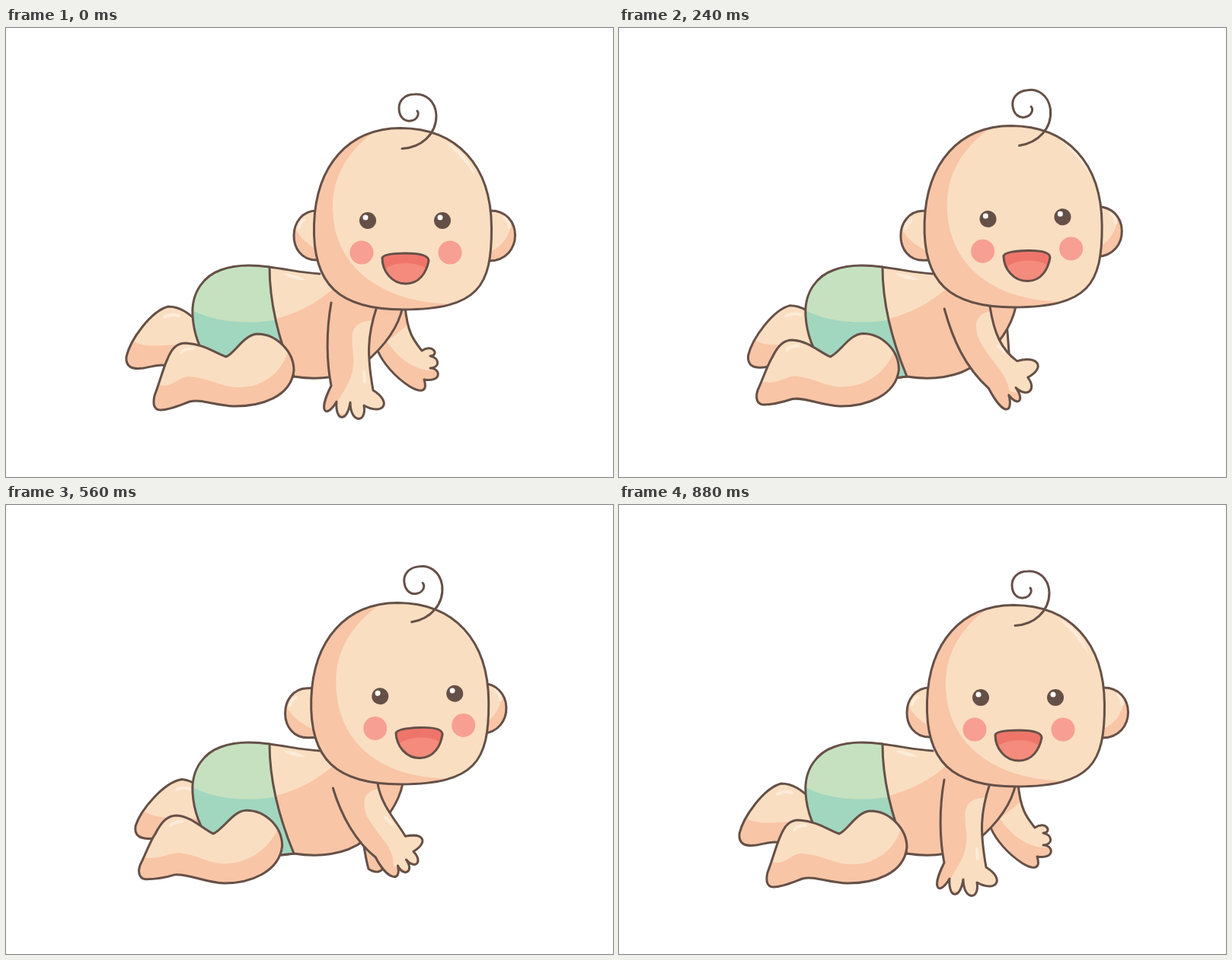
An HTML page with a canvas that plays this animation: 797x590 px, repeating every 0.92 s.

```html
<!DOCTYPE html>
<html lang="en">
<head>
<meta charset="utf-8">
<title>Crawling baby</title>
<style>
html, body { margin: 0; width: 100%; height: 100%; overflow: hidden; background: #fff; }
canvas { display: block; }
</style>
</head>
<body>
<canvas id="stage" width="797" height="590"></canvas>
<script>
const ctx = document.getElementById('stage').getContext('2d');
const LINE = '#655047', SKIN = '#fadec1', SHADE = '#f8c5a6', SHINE = '#fdebd9';
const LOOP = 920, STEP = 40;

// Moves are "x y degrees"; leg is a blend factor, glow shifts the light on the head.
const plant = {
  near: 'M427 361C420 400 421 440 427 470C408 508 422 512 434 491C432 517 448 519 452 492C452 520 474 520 470 496C495 510 508 492 482 476C474 430 474 405 487 366',
  nearLight: 'M490 384C450 384 453 400 456 430C459 465 440 475 430 505L510 520L500 430',
  glint: 'M470 452L471 465',
  far: 'M524 366C527 400 535 410 546 424C560 414 570 430 557 431C570 434 570 446 557 447C570 446 574 466 549 462C554 478 545 480 530 471C510 458 495 440 488 424',
  farLight: 'M500 412C520 440 540 450 560 450L600 430L540 380',
  head: '0 0 0', ears: '0 0 0', hair: '0 0 0', face: '0 0 0', farLeg: '0 0 0', leg: '0', glow: '0'
};
const push = {
  near: 'M426 364C429 410 440 450 458 480C460 526 471 520 477 494C482 518 496 514 491 488C498 510 520 508 513 485C540 484 540 464 508 460C486 425 482 405 487 366',
  nearLight: 'M490 378C455 378 460 400 468 420C488 455 483 470 477 497L500 530L560 460',
  glint: 'M487 417L492 430',
  far: 'M519 366C519 400 520 422 528 434C544 428 554 442 538 444C552 445 552 458 540 456C548 458 552 474 540 472C535 474 528 472 522 468C508 455 498 440 492 420',
  farLight: 'M508 390C512 430 520 450 535 470L600 460L540 380',
  head: '-3 -3 0', ears: '-4 -2.5 -1', hair: '-1 -2.5 -2.5', face: '2 -2 -1', farLeg: '7 -0.5 0', leg: '0.32', glow: '2'
};
const lift = {
  near: 'M429 374C445 410 465 440 505 465C540 494 554 486 538 467C555 474 562 462 544 454C566 462 570 440 552 433C572 412 556 398 532 417C515 420 500 395 487 366',
  nearLight: 'M492 368C470 372 472 395 480 408C500 440 525 430 537 458L600 440L560 380',
  glint: 'M504 419L517 423',
  far: 'M500 400C505 430 505 450 503 467C506 470 502 474 497 472C506 488 494 490 484 482C482 487 478 488 474 486C470 489 466 486 462 480C455 470 450 452 446 435',
  farLight: 'M452 445C470 456 470 472 481 483L540 480L520 400',
  head: '-3.5 -3 0', ears: '-11.5 -2.5 -1.6', hair: '13 -5 -7', face: '17 -2 -2', farLeg: '15 -2 0', leg: '0.82', glow: '8'
};
const reach = {
  near: 'M431 377C445 408 470 440 508 458C546 474 566 479 547 457C566 464 574 448 554 440C575 446 580 424 556 421C572 397 556 380 534 407C518 412 500 390 489 366',
  nearLight: 'M493 368C472 372 474 390 484 404C505 435 535 420 540 452L610 450L560 370',
  glint: 'M504 407L516 413',
  far: 'M500 400C498 430 494 445 497 449C505 452 504 460 494 461C504 464 502 474 489 473C496 486 488 492 475 481C468 488 462 490 456 483C448 472 444 455 438 435',
  farLight: 'M448 446C463 458 463 472 476 482L540 470L520 400',
  head: '-3.5 -2.5 0', ears: '-12.5 -2 -1.6', hair: '15 -5 -7', face: '19 -1 -2', farLeg: '17 -2 0', leg: '1', glow: '9'
};
const land = {
  near: 'M427 365C432 410 444 445 452 468C438 512 455 514 466 491C462 517 482 517 482 492C482 519 502 519 501 494C525 500 536 490 507 470C502 420 483 405 487 366',
  nearLight: 'M490 378C457 380 460 400 464 420C480 460 470 470 464 498L490 530L560 480',
  glint: 'M488 419L492 432',
  far: 'M515 366C503 395 510 415 522 423C536 408 548 426 530 430C550 424 548 438 535 440C552 440 548 462 530 460C532 478 520 474 508 471C500 455 495 440 495 415',
  farLight: 'M500 432C510 436 530 442 545 442L590 430L520 390',
  head: '-4 -3.5 0', ears: '-9.5 -2.7 -1.4', hair: '8 -4 -5', face: '11 -2.5 -2', farLeg: '18 -9 10', leg: '0.6', glow: '6'
};
const settle = {
  near: 'M426 362C424 400 435 440 435 466C412 506 428 512 440 488C437 518 454 519 457 492C456 526 478 524 477 499C500 512 518 502 489 478C490 430 478 410 487 366',
  nearLight: 'M488 380C455 380 458 400 462 425C466 465 455 470 441 490L470 540L530 480',
  glint: 'M480 454L480 468',
  far: 'M520 366C512 395 513 408 530 415C540 404 548 406 540 418C556 412 562 424 548 429C562 430 568 442 549 446C552 468 545 468 530 466C505 462 495 450 485 440',
  farLight: 'M494 410C500 435 520 448 550 444L600 430L530 380',
  head: '-3 -3 0', ears: '-5.5 -2.5 -1', hair: '1 -2.5 -3', face: '4 -2 -1.2', farLeg: '14 -9 10', leg: '0.38', glow: '2'
};
const times = [0, 160, 320, 480, 640, 720, 880, LOOP];
const poses = [plant, push, lift, reach, land, settle, plant, plant];

const legDown = 'M236 414C262 416 272 426 289 432C300 428 312 403 330 402C355 402 378 425 378 450C374 485 335 497 300 497C275 496 255 487 241 491C230 495 215 502 203 502C193 502 193 492 195 483C202 465 207 445 212 435C218 420 225 414 236 414Z';
const legBack = 'M222 407C240 408 254 424 269 432C283 426 296 401 313 401C338 401 360 422 360 448C356 482 318 497 284 497C258 496 235 483 218 485C205 489 190 490 180 490C170 489 170 478 173 471C181 455 187 440 193 432C202 415 210 407 222 407Z';
const legDownLight = 'M190 462C215 482 222 458 240 458C275 460 285 478 325 470C350 462 365 445 372 420L360 380L190 380';
const legBackLight = 'M165 460C200 468 210 456 228 457C258 462 272 478 305 468C330 460 345 445 355 425L345 380L170 380';
const headShape = 'M518 131.5C592 132 637 180 637.5 262C638 340 620 369.5 522 370C437 370 402 337 404.5 258C407 180 450 132 518 131.5Z';
const mouthShape = 'M494 302C496 297 510 296 525 296C540 296 555 298 555 306C552 321 543 336 525 336C506 336 494 319 494 302Z';

const NUMBER = /-?\d+(\.\d+)?/g;
const numbers = text => text.match(NUMBER).map(Number);
const refill = (text, values) => { let n = 0; return text.replace(NUMBER, () => values[n++]); };

function blend(from, to, k) {
  const a = numbers(from), b = numbers(to);
  return refill(from, a.map((v, i) => v + (b[i] - v) * k));
}

// Monotone cubic through the poses, so turning points come to rest.
function poseAt(t) {
  let i = 0;
  while (times[i + 1] <= t) i++;
  const span = times[i + 1] - times[i], u = (t - times[i]) / span, last = times.length - 1;
  const result = {};
  for (const part in plant) {
    const rows = poses.map(p => numbers(p[part]));
    const slope = (j, c) => j < 0 || j >= last ? 0 : (rows[j + 1][c] - rows[j][c]) / (times[j + 1] - times[j]);
    const tangent = (j, c) => {
      const a = slope(j - 1, c), b = slope(j, c);
      return a * b > 0 ? 2 * a * b / (a + b) : 0;
    };
    result[part] = refill(plant[part], rows[i].map((v, c) => {
      const d = rows[i + 1][c] - v;
      return +(v + d * u * u * (3 - 2 * u)
        + span * u * (1 - u) * ((1 - u) * tangent(i, c) - u * tangent(i + 1, c))).toFixed(3);
    }));
  }
  return result;
}

function fill(path, color) {
  ctx.fillStyle = color;
  ctx.fill(new Path2D(path));
}
function stroke(path, color = LINE, width = 3) {
  ctx.strokeStyle = color;
  ctx.lineWidth = width;
  ctx.stroke(new Path2D(path));
}
function disc(x, y, r, color) {
  ctx.fillStyle = color;
  ctx.beginPath();
  ctx.arc(x, y, r, 0, 2 * Math.PI);
  ctx.fill();
}
function inside(path, draw) {
  ctx.save();
  ctx.clip(new Path2D(path));
  draw();
  ctx.restore();
}
function shaded(path, light, glint, dark = SHADE, bright = SKIN) {
  fill(path, dark);
  inside(path, () => {
    fill(light, bright);
    if (glint) stroke(glint, SHINE, 4);
  });
  stroke(path);
}
function moved(move, px, py, draw) {
  const [x, y, angle] = numbers(move);
  ctx.save();
  ctx.translate(px + x, py + y);
  ctx.rotate(angle * Math.PI / 180);
  ctx.translate(-px, -py);
  draw();
  ctx.restore();
}

function drawTorso() {
  const back = 'M345 314C370 317 390 322 412 323';
  const belly = 'C410 463 445 460 470 441C495 420 515 395 521 366';
  const torso = back + 'L521 366C515 395 495 420 470 441C445 460 410 463 378 458C354 400 346 350 345 314Z';
  fill(torso, SHADE);
  inside(torso, () => {
    fill('M330 388C380 378 405 363 428 344L420 300L330 300Z', SKIN);
    fill('M363 322Q384 324 393 331Q373 331 363 322', SHINE);
  });
  stroke(back);
  stroke('M362 460L378 458' + belly);
  shaded('M346 314C346 350 354 400 378 458L360 460L270 445C250 418 246 395 245 378C243 345 262 325 282 318C300 311 325 311 346 314Z',
    'M235 365C265 386 310 391 360 383L360 300L235 300Z', '', '#a1d6bf', '#c6e1bf');
}

function drawFace() {
  for (const x of [475, 573]) {
    disc(x, 253, 11, LINE);
    disc(x - 3, 249, 3.5, '#fff');
  }
  disc(467, 295, 15.5, '#f79f92');
  disc(583, 295, 15.5, '#f79f92');
  fill(mouthShape, '#ef756a');
  inside(mouthShape, () => {
    ctx.fillStyle = '#f48b7c';
    ctx.beginPath();
    ctx.ellipse(525, 330, 36, 21, 0, 0, 2 * Math.PI);
    ctx.fill();
  });
  stroke(mouthShape);
}

function drawHead(pose) {
  const glow = +pose.glow;
  moved(pose.head, 0, 0, () => {
    fill(headShape, SHADE);
    inside(headShape, () => {
      fill(`M${492 + glow} 130C${440 + glow} 165 ${428 + glow} 205 ${429 + glow} 240
        C${432 + glow} 320 500 358 572 362L660 370L660 120Z`, SKIN);
      ctx.translate(glow, 0);
      fill('M577 150Q605 161 617 196Q600 170 577 150', SHINE);
    });
    stroke(headShape);
  });
  moved(pose.face, 475, 253, drawFace);
  moved(pose.hair, 520, 158, () =>
    stroke('M520 158.5C545 157 565 140 565 115C564 95 550 86 537 87C522 87 516 97 516 105C516 118 524 123 531 122C540 121 543 113 540 109'));
}

function draw(t) {
  const pose = poseAt(t), k = +pose.leg;
  ctx.clearRect(0, 0, 797, 590);
  moved(pose.ears, 523, 272, () => {
    shaded('M430 240L408 240C369 240 367 305 408 305L430 305', 'M370 230L378 260Q388 282 414 294L440 230Z', 'M385 262Q387 255 392 252');
    shaded('M615 240L634 240C680 238 680 306 634 306L615 306', 'M610 230L610 296L636 294Q662 282 664 250L660 230Z', 'M655 249Q660 254 661 262');
  });
  moved(pose.farLeg, 213, 366, () =>
    shaded('M262 430L256 390C240 374 228 366 213 366C190 372 163 410 158 432C157 445 165 449 180 447C195 444 205 441 215 445',
      'M165 410C185 424 205 414 265 416L250 350L190 350Z', 'M208 380Q216 375 227 378'));
  shaded(pose.far, pose.farLight);
  drawTorso();
  shaded(blend(legDown, legBack, k), blend(legDownLight, legBackLight, k),
    blend('M230 427Q234 421 245 421', 'M214 420Q218 415 229 415', k));
  shaded(pose.near, pose.nearLight, pose.glint);
  drawHead(pose);
}

function tick() {
  draw(Math.floor(performance.now() % LOOP / STEP) * STEP);
  requestAnimationFrame(tick);
}
ctx.lineCap = ctx.lineJoin = 'round';
tick();
</script>
</body>
</html>
```
